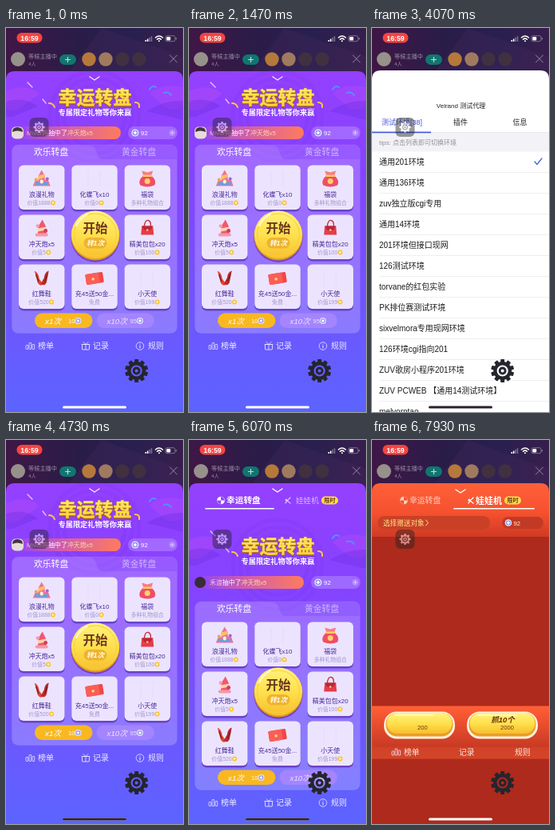
An HTML page that plays this animation: 222 px wide and 480 px high, repeating every 8000 ms.

```html
<!DOCTYPE html>
<html lang="zh-CN">
<head>
<meta charset="utf-8">
<title>幸运转盘</title>
<style>
html, body { margin: 0; width: 100%; height: 100%; overflow: hidden; background: #2b2150; }
svg { display: block; width: 100vw; height: 100vh; }
text { font-family: "Liberation Sans", "Noto Sans CJK SC", "Noto Sans CJK", sans-serif; white-space: pre; }
</style>
</head>
<body>
<svg id="stage" viewBox="0 0 222 480" preserveAspectRatio="none"></svg>
<script>
const LOOP = 8000;

// Drawing helpers; text is placed by its vertical centre.
const text = (x, y, s, size, fill = '#fff', more = '') =>
  `<text x="${x}" y="${y + size * .37}" font-size="${size}" fill="${fill}" ${more}>${s}</text>`;
const mid = (x, y, s, size, fill, more = '') => text(x, y, s, size, fill, 'text-anchor="middle" ' + more);
const rect = (x, y, w, h, r, fill, more = '') =>
  `<rect x="${x}" y="${y}" width="${w}" height="${h}" rx="${r}" fill="${fill}" ${more}/>`;
const circle = (x, y, r, fill, more = '') => `<circle cx="${x}" cy="${y}" r="${r}" fill="${fill}" ${more}/>`;
const path = (d, fill, more = '') => `<path d="${d}" fill="${fill}" ${more}/>`;
const line = (d, color, w = 1) => path(d, 'none', `stroke="${color}" stroke-width="${w}" stroke-linecap="round" stroke-linejoin="round"`);
const group = (id, body) => `<g id="${id}">${body}</g>`;
const shift = (x, y, body) => `<g transform="translate(${x} ${y})">${body}</g>`;
const gradient = (id, stops, flat) =>
  `<linearGradient id="${id}" x2="${flat ? 1 : 0}" y2="${flat ? 0 : 1}">` +
  stops.map(([at, color, alpha = 1]) => `<stop offset="${at}" stop-color="${color}" stop-opacity="${alpha}"/>`).join('') +
  '</linearGradient>';
const sheetShape = (y, fill) => path(`M0 ${y + 11}Q0 ${y} 11 ${y}H211Q222 ${y} 222 ${y + 11}V482H0Z`, fill);
const bold = 'font-weight="bold"';

function gear(x, y, r, fill, teeth) {
  let body = '';
  for (let i = 0; i < teeth; i++)
    body += `<rect x="${-r * .17}" y="${-r}" width="${r * .34}" height="${r * .36}" rx="${r * .06}" fill="${fill}" transform="rotate(${i * 360 / teeth})"/>`;
  body += circle(0, 0, r * .64, 'none', `stroke="${fill}" stroke-width="${r * .3}"`) +
    circle(0, 0, r * .24, 'none', `stroke="${fill}" stroke-width="${r * .2}"`);
  return shift(x, y, body);
}

const defs = '<defs>' +
  gradient('room', [[0, '#3f1746'], [.4, '#2a1c48'], [.7, '#28204f'], [1, '#371e4c']], true) +
  gradient('violet', [[0, '#9440ff'], [.3, '#8543ff'], [.6, '#7650ff'], [1, '#5b64ff']]) +
  gradient('gold', [[0, '#fff069'], [1, '#ffd02f']]) +
  gradient('button', [[0, '#fff27c'], [.5, '#ffe04d'], [1, '#f7bf2d']]) +
  gradient('ticker', [[0, '#ff7a6a', 0], [.45, '#ff7274', .6], [1, '#ff7b5c']], true) +
  gradient('redHead', [[0, '#ff6038'], [.55, '#f5512f'], [1, '#d03a24']]) +
  gradient('redStrip', [[0, '#ff6037'], [.25, '#f15230'], [.75, '#c93b24'], [1, '#d24428']]) +
  '</defs>';

const guests = ['#b5793a', '#a07a5e', '#41303f', '#41303f'];
const room = rect(0, 0, 222, 480, 0, 'url(#room)') +
  path('M120 0L222 36V60H75Z', '#472a5c', 'opacity=".3"') +
  circle(15, 39, 9, '#96918a') +
  text(28, 35.5, '等候主播中', 7.2, '#9a8fa6') + text(28, 45, '4人', 6.2, '#9a8fa6') +
  rect(67, 33, 21, 13, 6.5, '#11766f') + line('M77.5 36.5V42.5M74.5 39.5H80.5', '#c5d8d8', 1.2) +
  guests.map((c, i) => circle(104 + i * 21, 39, 8.7, c)).join('') +
  line('M205.5 34L214.5 43M214.5 34L205.5 43', '#94899f', 1);

const status = rect(13.5, 6, 32, 12.5, 6.2, '#f5443f') +
  mid(29.5, 12.3, '16:59', 8.8, '#fff', bold) +
  [0, 1, 2, 3].map(i => rect(174.5 + i * 2.4, 15 - i * 1.6, 1.6, 2 + i * 1.6, .5, i < 2 ? '#fff' : '#7a7189')).join('') +
  line('M187.5 12Q192 8 196.5 12M189.5 14.2Q192 12 194.5 14.2', '#fff', 1.5) + circle(192, 16.2, 1, '#fff') +
  rect(200, 9.7, 12, 7, 2, 'none', 'stroke="#9d94a6" stroke-width=".7"') + rect(201.3, 11, 5, 4.4, 1, '#fff') +
  rect(212.8, 12, 1, 2.5, .5, '#9d94a6');

const coin = (x, y, r) => circle(x, y, r, '#e3e3ff') + circle(x, y, r * .7, '#8e91e5') +
  path(`M${x} ${y - r * .5}L${x + r * .5} ${y}L${x} ${y + r * .5}L${x - r * .5} ${y}Z`, '#fff');
const chevron = y => line(`M105 ${y - 2}L111 ${y + 2}L117 ${y - 2}`, '#fff', 1.4);

// Small prize pictures, each around its own centre.
const cake = path('M-11 9L-8 2H-4V-4L0-11L4-4V1H8L11 9Z', '#ef7394') + path('M-9 4H9L7 8H-7Z', '#6a9fe0') +
  path('M-4-4L4-6V-2L-4 1Z', '#ffc064') + rect(-2, 1, 4, 5, 2, '#fff0d6') + circle(-7, 1, 2, '#f5a446') + circle(7, 0, 2, '#a566d9');
const pouch = path('M-5-4Q-12 2-9 8Q0 12 9 8Q12 2 5-4Z', '#ef4e68') + path('M-7-10L0-8L7-10L5-4H-5Z', '#f77c87') +
  rect(-6, -5, 12, 2.5, 1, '#ffc860') + circle(0, 3, 3.5, '#ffcf6a');
const rocket = path('M-5 9L-4-3L1-11L5-3L6 9Z', '#ef5970') + path('M-5 0L6-2V2L-5 4Z', '#ffd3b0') +
  rect(-8, 6, 16, 4, 2, '#f598a5') + circle(-5, -3, 2.2, '#f5a0ae') + circle(5, 3, 2.4, '#d33b60');
const bag = line('M-4-2Q-3-11 1-10Q5-9 4-2', '#c72c3e', 1.4) + path('M-7-3H7L8 8H-8Z', '#e53c4a') +
  path('M-7-3H7L4 2H-4Z', '#bc2638') + circle(0, 2, 1.3, '#ffd06e');
const shoes = path('M-9-9Q-4-7-3 1L2 8Q-2 11-5 6Z', '#e24332') + path('M9-9Q4-8 3 0L-1 7Q3 11 6 6Z', '#bd2a28') +
  line('M-7-4L-4 4M7-4L4 4', '#652329', 1.3);
const envelope = '<g transform="rotate(-9)">' + rect(-11, -6, 22, 13, 1.5, '#f04745') + rect(-11, -6, 17, 13, 1.5, '#fb5d57') + circle(-2, 1, 1.8, '#ffd27c') + '</g>';
const wisp = path('M-8-10V10M7-10V10', 'none', 'stroke="#dcd3f2" stroke-width=".5"');

const prizes = [
  ['浪漫礼物', '价值1888', cake], ['化蝶飞x10', '价值0', wisp], ['福袋', '多种礼物组合', pouch],
  ['冲天炮x5', '价值5', rocket], null, ['精美包包x20', '价值100', bag],
  ['红舞鞋', '价值520', shoes], ['充45送50金...', '免费', envelope], ['小天使', '价值199', wisp]
];

function prizeCard(prize, i) {
  if (!prize) return '';
  const [name, price, art] = prize, x = 16 + i % 3 * 66.3, y = 171.5 + Math.floor(i / 3) * 62;
  const priced = price.startsWith('价值'), coinX = x + 31.5 + price.length * 1.9;
  return rect(x, y + 2, 57.5, 56, 6, '#6a43c9') + rect(x, y, 57.5, 55.5, 6, '#ece4ff') +
    shift(x + 28.7, y + 17, art) +
    mid(x + 28.7, y + 36.5, name, 8, '#482a96', 'font-weight="500"') +
    mid(x + (priced ? 25 : 28.7), y + 47, price, 6.9, '#a396c8') +
    (priced ? circle(coinX, y + 47, 3, '#f8c331') + circle(coinX, y + 47, 1.4, '#fff1ab') : '');
}

const bars = (x, y) => [5, 8, 6].map((h, i) => rect(x + i * 4, y + 4 - h, 2.7, h, .6, 'none', 'stroke="#eee8ff" stroke-width=".8"')).join('');
const nav = y => bars(25, y) + text(40, y, '榜单', 10, '#f1ecff') +
  rect(95.5, y - 2, 9, 6.5, .8, 'none', 'stroke="#eee8ff" stroke-width=".9"') + line(`M95 ${y - 2}H105M100 ${y - 2}V${y + 4}M97 ${y - 5}L100 ${y - 2}L103 ${y - 5}`, '#eee8ff', .8) +
  text(109, y, '记录', 10, '#f1ecff') +
  circle(168, y, 4.8, 'none', 'stroke="#eee8ff" stroke-width=".8"') + line(`M168 ${y - .5}V${y + 2.5}M168 ${y - 2.5}V${y - 2.4}`, '#eee8ff') +
  text(178, y, '规则', 10, '#f1ecff');

const playPill = (x, fill, ink, label, price) => rect(x, 356.5, 72.5, 18.5, 9.2, fill) +
  text(x + 13, 366, label, 9.8, ink, 'font-weight="500" font-style="italic"') +
  text(x + 42, 366, price, 7.5, ink) + coin(x + 54.5, 366, 4);

const wheel = rect(7.5, 146, 207, 235.5, 8, '#fff', 'fill-opacity=".13" stroke="#fff" stroke-opacity=".12" stroke-width=".7"') +
  path('M8 154Q8 146.5 16 146.5H104Q110 146.5 112 152L116 161Q117 164 121 164H214V374Q214 381 207 381H15Q8 381 8 374Z', '#fff', 'opacity=".09"') +
  text(35, 155, '欢乐转盘', 10.8, '#fff', 'font-weight="500"') + text(145, 155, '黄金转盘', 10.8, '#cdb5ff') +
  prizes.map(prizeCard).join('') +
  circle(112, 262, 30.7, '#7640c4') + circle(112, 260, 30.5, '#d9971f') + circle(112, 258.5, 30, 'url(#button)') +
  circle(112, 258.5, 26.5, 'none', 'stroke="#f7ce40" stroke-width="1"') + line('M88 247Q93 237 102 233', '#fffbd0', 2) +
  mid(112, 250.5, '开始', 15.5, '#6b351b', bold) +
  rect(97.5, 262, 29, 13.5, 6.7, '#eeb32e') + mid(112, 268.7, '转1次', 8.7, '#fffbe5', bold + ' font-style="italic"') +
  playPill(36, '#f9b820', '#fff', 'x1次', '10') + playPill(113.5, '#a485ff', '#ece3ff', 'x10次', '95') +
  nav(397.5);

const ribbons = [38, 47, 56].map(r => circle(111, 110, r, 'none', 'stroke="#6a25dc" stroke-width="5" opacity=".1"')).join('') +
  path('M0 79Q25 68 42 82L16 101Q0 106 0 98Z', '#b94bf5', 'opacity=".4"') +
  path('M0 92Q22 85 40 98L8 111H0Z', '#6a2be0', 'opacity=".35"') +
  path('M222 74Q193 68 180 82L201 100Q216 104 222 96Z', '#b14df8', 'opacity=".4"') +
  path('M222 91Q198 90 176 104L222 115Z', '#6a2be0', 'opacity=".35"') +
  line('M27 68L33 74M46 89L50 94', '#e2b4ff', 1.6) + line('M180 77Q183 71 188 74M198 81Q204 79 207 84', '#5b8dff', 2) +
  line('M54 94Q59 94 61 99M162 93Q168 93 167 99', '#ffc83c', 2);
const banner = ribbons + mid(111.5, 87.2, '幸运转盘', 23, '#a4561e', bold + ' stroke="#a4561e"') +
  mid(111.5, 86, '幸运转盘', 23, 'url(#gold)', 'font-weight="900" stroke="#ffdc46" stroke-width=".5"') +
  mid(111.5, 105.7, '专属限定礼物等你来赢', 9.2, '#fff', bold);

const winner = (name, face) => rect(7, 123, 137, 16, 8, 'url(#ticker)') + face +
  text(26, 131.5, `<tspan fill="#ffc4df">${name}</tspan>抽中了<tspan fill="#ffd9a8">冲天炮x5</tspan>`, 7.9, '#fff') +
  rect(153, 123, 62, 16, 8, '#fff', 'opacity=".2"') + coin(162, 131, 4.6) + text(169, 131.2, '92', 8, '#fff') +
  circle(208.5, 131, 4, '#fff', 'opacity=".2"') + line('M206.5 131H210.5M208.5 129V133', '#e6d6ff', .8);

const face = rect(7, 123.5, 15, 15, 5, '#e6ddd8') + path('M8 130Q8 124 14 124Q21 124 21 130Q14 127 8 130Z', '#44343e');
const plainPanel = sheetShape(54, 'url(#violet)') + chevron(63) + banner + winner('Mivor舟', face) + wheel;

const tabs = (wheelActive, dim) => {
  const a = wheelActive ? '#fff' : dim, b = wheelActive ? dim : '#fff';
  return circle(40, 75.5, 4.8, a) + path('M40 75.5V71A4.5 4.5 0 0 1 44.5 75.5ZM40 75.5V80A4.5 4.5 0 0 1 35.5 75.5Z', wheelActive ? '#9044ff' : '#ef5330') +
    text(47, 75.5, '幸运转盘', wheelActive ? 10.7 : 9.8, a, `font-weight="${wheelActive ? 'bold' : 400}"`) +
    line('M127 72L123 76L121 79M123 76L127 79', b, 1.3) + circle(122, 75, 1.5, b) +
    text(wheelActive ? 134 : 130, 75.5, '娃娃机', wheelActive ? 9.6 : 11, b, `font-weight="${wheelActive ? 400 : 'bold'}"`) +
    rect(166, 70.5, 21, 10, 5, '#ffdf4d') + mid(176.5, 75.5, '限时', 7.2, '#6b3518', bold) +
    rect(wheelActive ? 20 : 102, 85, wheelActive ? 87 : 102, 1.6, .8, '#fff');
};
const tabbedPanel = sheetShape(54, 'url(#violet)') + chevron(63) + tabs(true, '#d9bcff') +
  shift(0, 46, banner) + shift(0, 47, winner('禾渡', circle(14, 131, 7, '#3a2c38'))) + shift(0, 56, wheel);

// Claw machine page: some parts load later.
const clawButton = (x, price) => rect(x, 339.5, 89, 34, 16, '#fff0df') +
  rect(x + 2.5, 341, 84, 29.5, 14, '#e99e25') + rect(x + 3.5, 341, 82, 26, 13, 'url(#button)') +
  line(`M${x + 14} 344H${x + 62}`, '#fff9cf', 1.5) + text(x + 42, 359, price, 7.6, '#713412');
const clawPanel = sheetShape(54, '#ad2a1c') +
  path('M0 65Q0 54 11 54H211Q222 54 222 65V121H0Z', 'url(#redHead)') + chevron(64) + tabs(false, '#ffd0bd') +
  rect(7, 95, 141, 17, 8.5, '#c94027') + text(14, 103.5, '选择赠送对象', 8.6, '#ffe68b', 'font-weight="500"') + line('M67.5 100L70.5 103.5L67.5 107', '#ffe68b') +
  rect(163, 96, 52, 15, 7.5, '#c23a25') + coin(171, 103.5, 4.3) + text(177.5, 103.7, '92', 7.8, '#ffe9df') +
  rect(0, 332.5, 222, 66, 0, 'url(#redStrip)') + rect(0, 384, 222, 14.5, 0, '#d5472b', 'opacity=".6"') +
  text(57, 359, '200', 7.6, '#7f2b16') + text(158, 359, '2000', 7.6, '#7f2b16') +
  text(40, 390, '榜单', 9.8, '#ffe8de') + text(109, 390, '记录', 9.8, '#ffe8de') + text(179, 390, '规则', 9.8, '#ffe8de') +
  group('clawButtons', clawButton(15, '200') + clawButton(119, '2000') + bars(25, 390)) +
  group('grabTen', mid(164, 349, '抓10个', 9.5, '#672b10', bold + ' font-style="italic"'));

const rows = ['通用201环境', '通用136环境', 'zuv独立版cgi专用', '通用14环境', '201环境但接口现网', '126测试环境', 'torvane的红包实验',
  'PK排位赛测试环境', 'sixvelmora专用现网环境', '126环境cgi指向201', 'ZUV歌房小程序201环境', 'ZUV PCWEB 【通用14测试环境】', 'melvorntao'];
const tick = y => line(`M204 ${y}L207 ${y + 3.5}L213 ${y - 4}`, '#4a66dc', 1.3);
const envTab = (id, n) => group(id, text(12, 117.5, `测试环境[${n}]`, 9, '#4458db') + tick(n === 40 ? 193 : 167));
const list = sheetShape(53, '#fff') +
  mid(111.5, 97, 'Velrand 测试代理', 8, '#222') +
  rect(0, 131, 222, 23.5, 0, '#f3f3f7') + rect(0, 130.3, 222, .6, 0, '#d9d9df') + rect(0, 129.6, 74, 1.7, 0, '#4458db') +
  mid(111, 117.5, '插件', 9, '#222') + mid(185.5, 117.5, '信息', 9, '#222') +
  text(9, 143.5, 'tips: 点击列表即可切换环境', 8, '#8c8c95') +
  rows.map((s, i) => text(9, 167.3 + i * 26, s, 10, '#1c1c20') + rect(9, 180 + i * 26, 213, .5, 0, '#dedee3')).join('') +
  envTab('env40', 40) + envTab('env38', 38);

const homeBar = fill => rect(71, 472.5, 80, 3, 1.5, fill);
document.getElementById('stage').innerHTML = defs + room +
  group('plain', plainPanel) + group('tabbed', tabbedPanel) + group('claw', clawPanel) + group('list', list) + status +
  `<g opacity=".45">${rect(29.5, 112, 24, 24, 6, '#222') + gear(41.5, 124, 7, '#fff', 8)}</g>` +
  gear(163.7, 428.5, 14.5, '#25252e', 10) +
  group('barLight', homeBar('#fff')) + group('barDark', homeBar('#2a2030'));

const play = (id, steps) => document.getElementById(id).animate(
  steps.map(([ms, props]) => ({ offset: ms / LOOP, ...props })), { duration: LOOP, iterations: Infinity });
const show = (id, from, to = LOOP) => {
  const on = { opacity: 1 }, off = { opacity: 0 };
  play(id, [[0, from ? off : on], [from, from ? off : on], [from, on], [to, on], [to, to < LOOP ? off : on], [LOOP, to < LOOP ? off : on]]);
};
const slide = y => ({ transform: `translateY(${y}px)` });

show('plain', 0, 4750);
show('tabbed', 4750, 6200);
show('claw', 6200);
show('clawButtons', 7300);
show('grabTen', 7800);
show('env40', 0, 3300);
show('env38', 3300);
show('barLight', 7000);
show('barDark', 2050, 7000);
document.getElementById('barLight').getAnimations().forEach(a => a.cancel());
play('list', [
  [0, slide(440)],
  [1900, { ...slide(440), easing: 'cubic-bezier(.2,.8,.2,1)' }],
  [2350, slide(0)],
  [4150, { ...slide(0), easing: 'cubic-bezier(.3,.5,.4,1)' }],
  [4500, slide(440)],
  [LOOP, slide(440)]
]);
</script>
</body>
</html>
```
